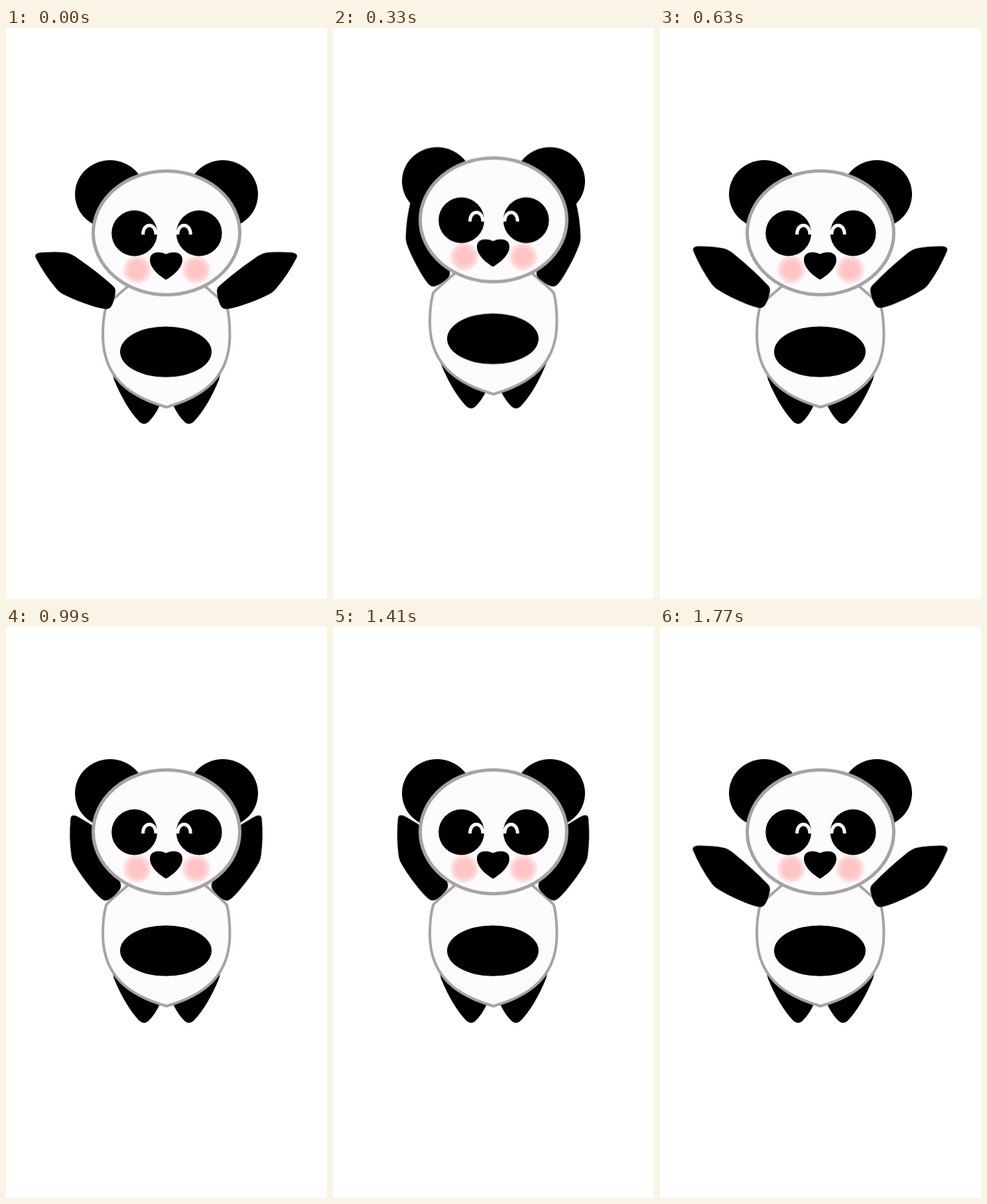
Animation of 484x860 px, one loop 1.8 s. Source, as an HTML page:

```html
<!DOCTYPE html>
<html lang="en">
<head>
<meta charset="utf-8">
<title>Jumping panda</title>
<style>
  html, body { margin: 0; width: 100%; height: 100%; overflow: hidden; background: #fff; }
  svg { display: block; width: 100%; height: 100%; }

  .fur { fill: #fdfbfd; stroke: #a5a3a5; }
  .smile { fill: none; stroke: #fff; stroke-width: 5; }

  .torso { animation: jump 1800ms linear infinite; }
  .legs { animation: push 1800ms linear infinite; }
  .arm { transform-origin: 170px 407px; animation: wave 600ms linear infinite; }

  /* squat at 240 ms, top at 360 ms, landing at 540 ms */
  @keyframes jump {
    0%, 30%, 100% { transform: translateY(0); }
    13.3333% { transform: translateY(19.7px); }
    20% { transform: translateY(-32px); }
  }
  @keyframes push {
    0%, 30%, 100% { transform: translateY(0); }
    13.3333% { transform: translateY(4px); }
    20% { transform: translateY(-32px); }
  }
  @keyframes wave {
    0%, 100% { transform: rotate(0deg); }
    50% { transform: rotate(47deg); }
  }
</style>
</head>
<body>
<svg viewBox="0 0 484 860">
  <defs>
    <radialGradient id="blush">
      <stop offset=".5" stop-color="#ffc5c5"/>
      <stop offset=".78" stop-color="#ffc5c5" stop-opacity=".6"/>
      <stop offset="1" stop-color="#ffc5c5" stop-opacity="0"/>
    </radialGradient>
    <path id="leg" d="M160 518L163 530Q180 571 201 593Q207 599 214 594Q224 585 232 568V540Z"/>
    <path id="arm" d="M45 341Q48 338 58 338Q78 337 90 338.5Q99 340 108 347Q136 366 161 388Q165 391 165 397C164 406 161 423 153 423Q146 424 128 418Q106 411 90 403Q81 399 76 393Q58 372 45 347Q43 343 45 341Z"/>
    <ellipse id="ear" cx="157" cy="250.3" rx="53" ry="51.2"/>
    <g id="face">
      <circle cx="198" cy="364" r="23" fill="url(#blush)"/>
      <circle cx="193.6" cy="309" r="34.4"/>
      <path class="smile" d="M206.5 311C206.5 292.5 226 292.5 226 311"/>
    </g>
  </defs>

  <g class="legs">
    <use href="#leg"/>
    <use href="#leg" transform="matrix(-1 0 0 1 484 0)"/>
  </g>

  <g class="torso">
    <path class="fur" stroke-width="4" d="M242 571C207 560 146 540 146 463Q146 436 151 419Q153 415 185 388H299Q331 415 333 419Q337.5 436 337.5 463C337.5 540 277 560 242 571Z"/>
    <ellipse cx="241" cy="487.6" rx="69" ry="38.2"/>
    <use class="arm" href="#arm"/>
    <g transform="matrix(-1 0 0 1 483 0)"><use class="arm" href="#arm"/></g>
    <use href="#ear"/>
    <use href="#ear" transform="matrix(-1 0 0 1 484 0)"/>
    <ellipse class="fur" stroke-width="5" cx="242" cy="308.5" rx="110.5" ry="93.2"/>
    <use href="#face"/>
    <use href="#face" transform="matrix(-1 0 0 1 484.8 0)"/>
    <path d="M241.3 379C234 375 217 363 217 349C217 335.5 233 336 241.3 340.5C249.5 336 266 335.5 266 349C266 363 248.5 375 241.3 379Z"/>
  </g>
</svg>
</body>
</html>
```
